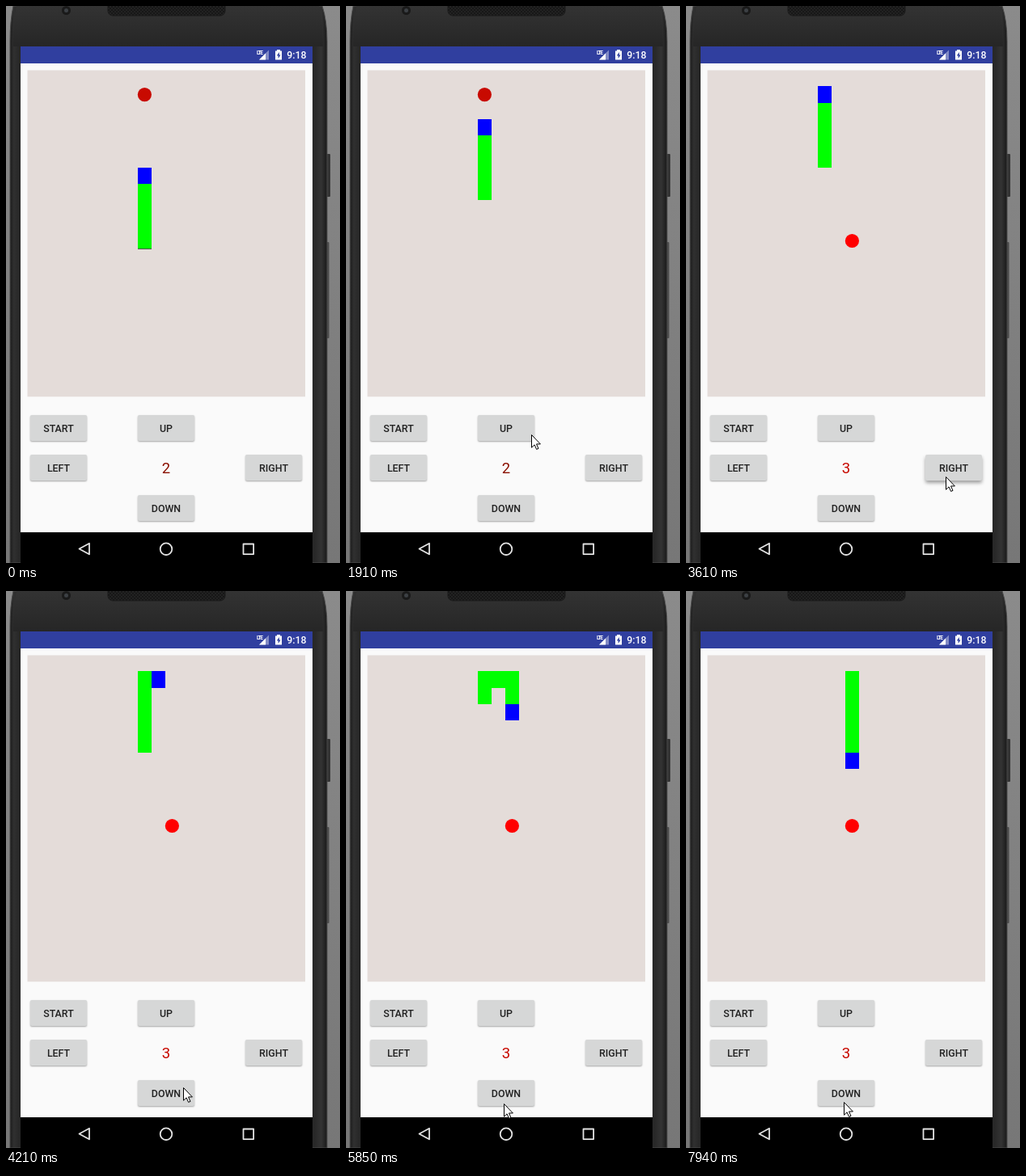
Animation of 413 by 689 pixels, one loop 8000 ms. Source, as an HTML page:

```html
<!DOCTYPE html>
<html lang="en">
<head>
<meta charset="utf-8">
<title>Snake on a phone</title>
<style>
  html, body { margin: 0; width: 100%; height: 100%; overflow: hidden; background: #808080; }
  #stage { position: absolute; left: 0; top: 0; width: 413px; height: 689px; overflow: hidden; font-family: Roboto, sans-serif; }
  svg { position: absolute; left: 0; top: 0; }
  .btn {
    position: absolute; width: 70px; height: 32px; border-radius: 2px;
    background: #d6d7d7; color: #212121; box-shadow: 0 1px 2px rgba(0, 0, 0, .34);
    font-size: 12.4px; font-weight: 500; line-height: 33px; text-align: center;
  }
  .btn.half { box-shadow: 0 2px 3px rgba(0, 0, 0, .34); }
  .btn.down { box-shadow: 0 3px 4px rgba(0, 0, 0, .36); }
  #score { position: absolute; left: 178px; top: 560px; width: 40px; font-size: 18.5px; line-height: 24px; text-align: center; }
</style>
</head>
<body>
<div id="stage">
  <svg width="413" height="689" viewBox="0 0 413 689">
    <defs>
      <linearGradient id="wall" x2="0" y2="1">
        <stop offset="0" stop-color="#8b8b8b"/><stop offset="1" stop-color="#777"/>
      </linearGradient>
      <linearGradient id="body">
        <stop offset="0" stop-color="#1c1c1c"/><stop offset=".012" stop-color="#303030"/>
        <stop offset=".03" stop-color="#272727"/><stop offset=".96" stop-color="#282828"/>
        <stop offset=".982" stop-color="#333"/><stop offset="1" stop-color="#191919"/>
      </linearGradient>
      <linearGradient id="top" x2="0" y2="1">
        <stop offset="0" stop-color="#333"/><stop offset="1" stop-color="#262626"/>
      </linearGradient>
      <pattern id="mesh" width="4" height="4" patternUnits="userSpaceOnUse">
        <rect width="4" height="4" fill="#171717"/>
        <circle cx="1" cy="1" r=".8" fill="#303030"/><circle cx="3" cy="3" r=".8" fill="#303030"/>
      </pattern>
    </defs>

    <rect width="413" height="689" fill="url(#wall)"/>
    <rect x="396" y="183" width="5" height="53" rx="1" fill="#343434"/>
    <rect x="396" y="292" width="3.5" height="119" rx="1" fill="#4b4b4b"/>
    <path d="M9 0Q5 18 5 44V689H397V44Q397 18 391 0Z" fill="url(#body)" stroke="#4a4a4a"/>
    <path d="M13 0Q9 18 9 50H392Q392 18 387 0Z" fill="url(#top)"/>
    <rect x="126" y="-8" width="145" height="20" rx="6" fill="url(#mesh)" stroke="#1b1b1b"/>
    <circle cx="74.5" cy="5.5" r="5.5" fill="#1a1a1a"/>
    <circle cx="74.5" cy="5.5" r="2.5" fill="#3c4044"/>

    <rect x="18" y="50" width="361" height="639" fill="#fafafa"/>
    <rect x="18" y="50" width="361" height="21" fill="#303f9f"/>
    <g fill="#fff" font-family="Roboto, sans-serif">
      <text x="310" y="59.5" font-size="6.5" font-weight="700" textLength="8">LTE</text>
      <path d="M325 54.5V66.5H313Z" opacity=".4"/>
      <path d="M321 58.5V66.5H313Z"/>
      <path d="M335 54h4v1.4h2V66.5H333V55.4h2Z"/>
      <path d="M337.8 57l-3 4.6h1.8V65l3-4.6h-1.8Z" fill="#303f9f"/>
      <text x="347.3" y="65" font-size="12.3" font-weight="500">9:18</text>
    </g>

    <rect x="26.5" y="79.5" width="343.5" height="403.8" fill="#e4dcd9"/>
    <rect x="18" y="651" width="361" height="38" fill="#000"/>
    <g fill="none" stroke="#e2e2e2" stroke-width="1.8" stroke-linejoin="round">
      <path d="M90.5 671.5L103 664.8V678.3Z"/>
      <circle cx="198" cy="671.7" r="7.3"/>
      <rect x="293.5" y="665.5" width="12.6" height="12.6"/>
    </g>

    <g id="snake" shape-rendering="crispEdges"></g>
    <circle id="food" r="8.6"/>
  </svg>

  <div class="btn" style="left:30px;top:506px">START</div>
  <div class="btn" style="left:163px;top:506px">UP</div>
  <div class="btn" style="left:30px;top:555px">LEFT</div>
  <div class="btn" id="right" style="left:296px;top:555px">RIGHT</div>
  <div class="btn" id="down" style="left:163px;top:605px">DOWN</div>
  <div id="score"></div>

  <svg width="413" height="689" viewBox="0 0 413 689">
    <path id="cursor" d="M.5 .5V16.2L4.1 12.8L6.6 18.4L9 17.4L6.5 11.9H11.4Z" fill="#fff" stroke="#000"/>
  </svg>
</div>

<script>
  const LOOP = 8000, TICK = 77, EATEN = 3215;
  const $ = id => document.getElementById(id);

  // Cells visited by the head, as [column, row]: up, right, then down.
  const path = [];
  for (let row = 10; row >= 1; row--) path.push([8, row]);
  path.push([9, 1]);
  for (let row = 1; row <= 6; row++) path.push([10, row]);

  const moves = [555, 1220, 1885, 2520, EATEN, 3880, 4600, 5210, 5850, 6550, 7170, 7830];

  // Pointer keys: time, x, y
  const track = [
    [283, 322, 700], [990, 194, 512], [1523, 194, 512], [2290, 264, 547],
    [2443, 264, 547], [2600, 268, 549], [3140, 320, 585], [3290, 321, 582],
    [3673, 321, 582], [4210, 219, 614], [4520, 206, 625], [5060, 196, 633],
    [5373, 196, 633], [5450, 195, 634], [6153, 195, 634], [6320, 188, 633],
    [7553, 188, 633], [7940, 195, 632]
  ];

  const cellX = col => 163 + 17 * (col - 8);
  const cellY = row => Math.round(99.4 + 20.1 * (row - 1));

  function rect(x, y, w, h, fill) {
    return `<rect x="${x}" y="${y}" width="${w}" height="${h}" fill="${fill}"/>`;
  }

  function drawSnake(t) {
    const step = moves.filter(m => t >= m).length;
    const head = 4 + step;
    const length = step > 5 ? 6 : 5;
    let out = step ? "" : rect(163, 300, 17, 1, "#555");
    for (let i = head - length + 1; i <= head; i++) {
      const [col, row] = path[i], y = cellY(row);
      out += rect(cellX(col), y, 17, cellY(row + 1) - y, i === head ? "#00f" : "#0f0");
    }
    $("snake").innerHTML = out;
  }

  function drawFood(t) {
    const eaten = t >= EATEN;
    const food = $("food"), score = $("score");
    food.setAttribute("cx", eaten ? 205.4 : 171.4);
    food.setAttribute("cy", eaten ? 290.5 : 109.6);
    food.setAttribute("fill", eaten ? "#f00" : "#c80a00");
    score.textContent = eaten ? 3 : 2;
    score.style.color = eaten ? "#c80a00" : "#8b1000";
  }

  // The pointer advances in ticks between its keys.
  function pointerAt(t) {
    const i = track.findLastIndex(k => t >= k[0]);
    const a = track[Math.max(i, 0)], b = track[i + 1] || a;
    if (a === b) return [a[1], a[2]];
    const n = Math.max(1, Math.round((b[0] - a[0]) / TICK));
    const f = Math.floor((t - a[0]) / (b[0] - a[0]) * n) / n;
    return [1, 2].map(j => Math.round(a[j] + (b[j] - a[j]) * f));
  }

  function drawPointer(t) {
    const [x, y] = pointerAt(t), cursor = $("cursor");
    cursor.setAttribute("visibility", t < 360 ? "hidden" : "visible");
    cursor.setAttribute("transform", `translate(${x} ${y})`);
  }

  function press(id, t, from, to) {
    const on = t >= from && t < to;
    $(id).className = "btn" + (!on ? "" : t < from + 80 ? " half" : " down");
  }

  function frame() {
    const t = performance.now() % LOOP;
    drawSnake(t);
    drawFood(t);
    drawPointer(t);
    press("right", t, 3520, 3830);
    press("down", t, 4900, 5210);
    requestAnimationFrame(frame);
  }
  frame();
</script>
</body>
</html>
```
